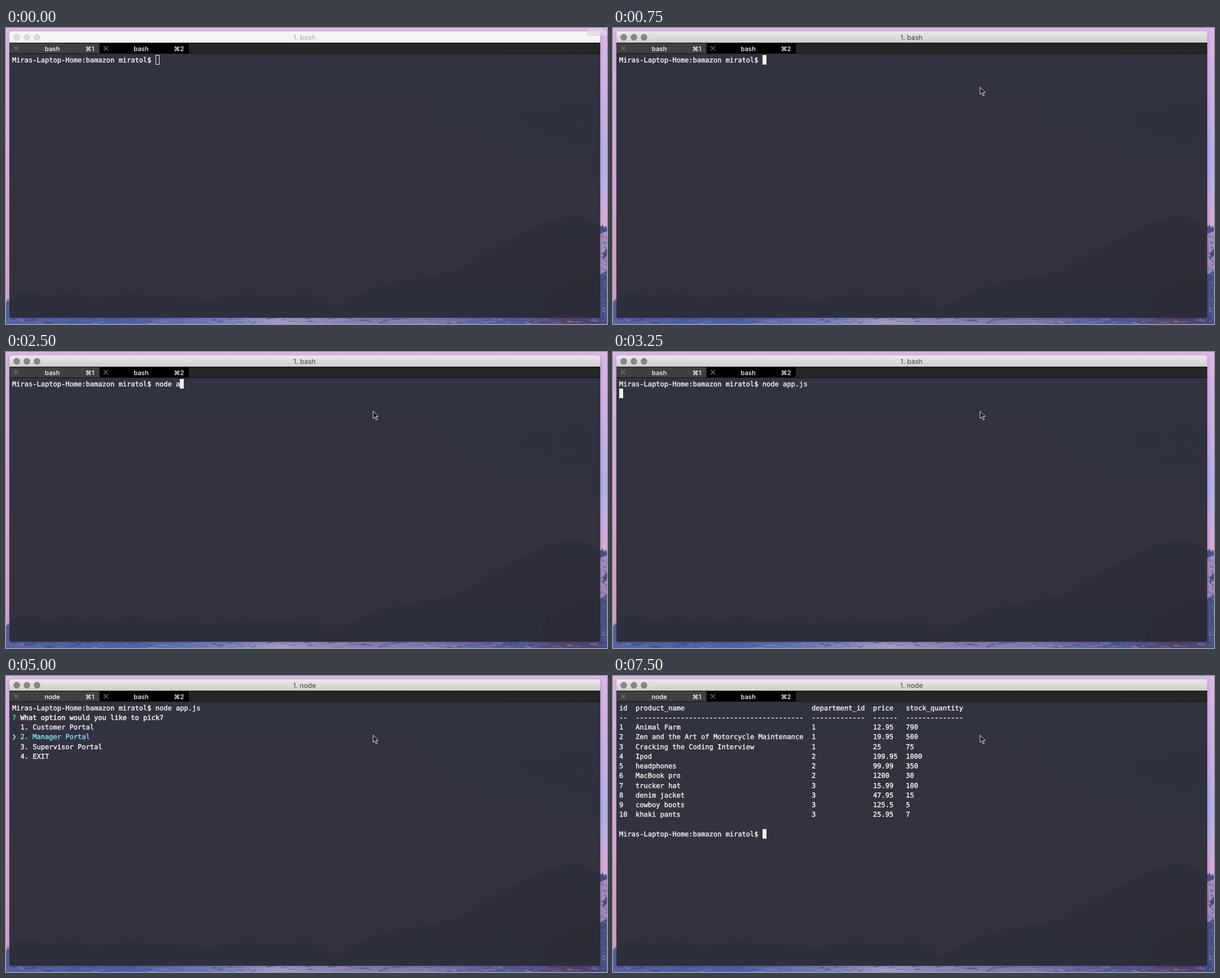
An HTML page that plays this animation: 1065 by 526 pixels, repeating every 8000 ms.

```html
<!DOCTYPE html>
<html lang="en">
<head>
<meta charset="utf-8">
<title>Terminal session</title>
<style>
  html, body { margin: 0; width: 100%; height: 100%; overflow: hidden; background: #d9aede; }
  svg { display: block; width: 1065px; height: 526px; }
  text { white-space: pre; text-rendering: geometricPrecision; }
  .ui { font: 12px Inter, "DejaVu Sans", sans-serif; text-anchor: middle; }
  .tab { font-size: 11.3px; font-weight: 500; fill: #fff; }
  #lines { font: 12.052px "DejaVu Sans Mono", monospace; }
  #lines text { fill: #f3f3f3; stroke: #f3f3f3; stroke-width: .4px; }
  #lines .bold { stroke-width: .55px; }
  #lines .green { fill: #2ce89c; stroke: #2ce89c; }
  #lines .cyan { fill: #83e3ef; stroke: #83e3ef; }
  #lines .dim { fill: #8b8a92; stroke: #8b8a92; }
  .cross { stroke: #777; stroke-width: 1.1; }
</style>
</head>
<body>
<svg viewBox="0 0 1065 526" xmlns="http://www.w3.org/2000/svg">
  <defs>
    <linearGradient id="sky" x2="0" y2="1">
      <stop offset="0" stop-color="#dfb8ea"/><stop offset=".35" stop-color="#dfb2e4"/>
      <stop offset=".75" stop-color="#e2a8d6"/><stop offset="1" stop-color="#d0a2d0"/>
    </linearGradient>
    <linearGradient id="rightSky" x2="0" y2="1">
      <stop offset="0" stop-color="#dcb6e8"/><stop offset=".28" stop-color="#cbaee8"/>
      <stop offset=".45" stop-color="#b0aeec"/><stop offset=".55" stop-color="#c2aee6"/>
      <stop offset=".66" stop-color="#dbaad8"/><stop offset="1" stop-color="#c692c4"/>
    </linearGradient>
    <linearGradient id="valley">
      <stop offset="0" stop-color="#5563a2"/><stop offset=".2" stop-color="#4c62a8"/>
      <stop offset=".36" stop-color="#7a82ba"/><stop offset=".45" stop-color="#a09cc8"/>
      <stop offset=".57" stop-color="#8883b6"/><stop offset=".7" stop-color="#7f7cb0"/>
      <stop offset=".85" stop-color="#535a96"/><stop offset=".94" stop-color="#574468"/>
      <stop offset="1" stop-color="#434b80"/>
    </linearGradient>
    <linearGradient id="bar" x2="0" y2="1">
      <stop offset="0" stop-color="#ebe9eb"/><stop offset="1" stop-color="#cfcdcf"/>
    </linearGradient>
    <linearGradient id="pane" x2="0" y2="1">
      <stop offset="0" stop-color="#323340"/><stop offset=".5" stop-color="#33323f"/>
      <stop offset=".85" stop-color="#34313e"/><stop offset="1" stop-color="#32313e"/>
    </linearGradient>
    <radialGradient id="cool" cx=".5" cy=".5" r=".5">
      <stop offset="0" stop-color="#2c303f" stop-opacity=".55"/><stop offset="1" stop-color="#2c303f" stop-opacity="0"/>
    </radialGradient>
    <filter id="soft" x="-5%" y="-5%" width="110%" height="110%"><feGaussianBlur stdDeviation="3"/></filter>
    <clipPath id="paneClip"><path d="M6 46H1053V511Q1053 515 1049 515H10Q6 515 6 511Z"/></clipPath>
  </defs>

  <rect width="1065" height="526" fill="url(#sky)"/>
  <rect x="1050" width="15" height="526" fill="url(#rightSky)"/>
  <path fill="#4a5288" d="M1050 350L1055 353 1057 349 1060 355 1063 351 1065 357V526H1050Z"/>
  <path fill="#a98dbe" d="M1053 366L1065 361V392L1059 398 1057 412 1065 404V431L1053 438Z"/>
  <path fill="url(#valley)" d="M0 488L4 481 7 490V514H1065V526H0Z"/>
  <g id="rocks"></g>
  <rect x="5" y="7" width="1049" height="510" rx="6" fill="#34204a" id="shadow" filter="url(#soft)"/>

  <path d="M6 46H1053V511Q1053 515 1049 515H10Q6 515 6 511Z" fill="url(#pane)"/>
  <g clip-path="url(#paneClip)">
    <ellipse cx="1010" cy="150" rx="300" ry="150" fill="url(#cool)"/>
    <path fill="#2c2e3b" d="M560 515L610 482 650 461 720 446 790 433 850 400 910 368 965 341 1010 332 1053 352V515Z" opacity=".6"/>
    <path fill="#2b2d38" d="M780 515L850 440 930 390 1000 350 1053 362V515Z" opacity=".3"/>
    <path fill="#2b2e3c" d="M6 480L30 465 70 476 110 470 160 481 220 471 290 478 360 482 420 473 500 477 530 470 570 490 610 515H6Z" opacity=".6"/>
    <path fill="#2b2b34" d="M940 515L960 470 1008 444 1053 436V515Z" opacity=".5"/>
  </g>

  <path d="M6 26V11Q6 6 11 6H1048Q1053 6 1053 11V26Z" id="title"/>
  <g id="lights"></g>
  <text class="ui" x="529" y="21" id="name"></text>

  <rect x="6" y="26" width="1047" height="20" fill="#262626"/>
  <rect x="6" y="27" width="159" height="18" fill="#404040"/>
  <rect x="166" y="27" width="158" height="19" fill="#000"/>
  <path d="M6 26.5H1053" stroke="#1a1a1a"/>
  <path d="M6 45.5H1053" stroke="#121216"/>
  <path class="cross" d="M14 32L22 40M22 32L14 40M173 32L181 40M181 32L173 40"/>
  <text class="ui tab" x="82" y="41" id="job"></text>
  <text class="ui tab" x="148.5" y="41">⌘1</text>
  <text class="ui tab" x="239.5" y="41">bash</text>
  <text class="ui tab" x="306.5" y="41">⌘2</text>

  <g id="lines"></g>
  <rect id="caret" stroke="#f0f0f0"/>
  <g id="notice">
    <path d="M1030 0H1065V13.500H1035Q1030 13.500 1030 8.500Z" fill="#e6d6ea" opacity=".72" stroke="#c9bfcc" stroke-width=".7"/>
    <text class="ui" x="1061" y="4" fill="#aaa0ad">10</text>
  </g>
  <path id="mouse" d="M0 0V13L3 10.300 5.200 15.800 7.300 14.900 5.100 9.500H9Z" fill="#14141a" stroke="#e8e8e8" stroke-linejoin="round"/>
</svg>
<script>
const LOOP = 8000, COL = 7.256, ROW = 17.23, LEFT = 11, TOP = 48;
const $ = id => document.getElementById(id);

function add(parent, tag, attrs, text = '') {
  const el = document.createElementNS('http://www.w3.org/2000/svg', tag);
  for (const k in attrs) el.setAttribute(k, attrs[k]);
  el.textContent = text;
  parent.append(el);
  return el;
}

// Each text piece is [row, column, text, class].
const PROMPT = 'Miras-Laptop-Home:bamazon miratol$ ';
const prompt = (typed, row = 0) => [[row, 0, PROMPT + typed]];
const command = prompt('node app.js');
const ask = (row, text) => [[row, 0, '?', 'green bold'], [row, 2, text, 'bold']];
const question = ask(1, 'What option would you like to pick?');
const hint = (row, col) => [[row, col, '(Use arrow keys)', 'dim']];

const menu = (row, items, picked) => items.flatMap((item, i) => i === picked
  ? [[row + i, 0, '❯', 'cyan'], [row + i, 2, item, 'cyan']]
  : [[row + i, 2, item]]);

const portals = ['1. Customer Portal', '2. Manager Portal', '3. Supervisor Portal', '4. EXIT'];
const tasks = ['1) List all products', '2) View low stock items', '3) Restock a product', '4) Add a new product'];

const columns = [0, 4, 47, 62, 70];
const dashes = [2, 41, 13, 6, 14].map(n => '-'.repeat(n)).join('|');
const table = `id|product_name|department_id|price|stock_quantity
${dashes}
1|Animal Farm|1|12.95|790
2|Zen and the Art of Motorcycle Maintenance|1|19.95|500
3|Cracking the Coding Interview|1|25|75
4|Ipod|2|199.95|1000
5|headphones|2|99.99|350
6|MacBook pro|2|1200|30
7|trucker hat|3|15.99|100
8|denim jacket|3|47.95|15
9|cowboy boots|3|125.5|5
10|khaki pants|3|25.95|7`.split('\n')
  .flatMap((line, row) => line.split('|').map((cell, i) => [row, columns[i], cell]));

const typing = typed => ({ lines: prompt(typed), caret: [0, PROMPT.length + typed.length] });

// Every step changes only the listed parts of the state.
const steps = [
  [0, { ...typing(''), active: false, notice: true, mouse: null, job: 'bash' }],
  [250, { notice: false, mouse: [738, 73] }],
  [500, { mouse: [650.6, 105] }],
  [750, { active: true }],
  [1750, typing('nod')],
  [2000, typing('node')],
  [2500, typing('node a')],
  [2750, typing('node app')],
  [3000, typing('node app.js ')],
  [3250, { lines: command, caret: [1, 0] }],
  [4000, { lines: [...command, ...question, ...hint(1, 38), ...menu(2, portals, 0)], caret: null }],
  [5000, { lines: [...command, ...question, ...menu(2, portals, 1)], job: 'node' }],
  [5250, { lines: command }],
  [5500, { lines: [...command, ...question, [1, 38, portals[1], 'cyan'],
    ...ask(2, 'Choice an option:'), ...hint(2, 21), ...menu(3, tasks, 0)] }],
  [7500, { lines: [...table, ...prompt('', 13)], caret: [13, PROMPT.length] }]
];
let last = {};
const states = steps.map(([at, change]) => [at, last = { ...last, ...change }]);

const lights = [19, 37, 55].map(cx => add($('lights'), 'circle', { cx, cy: 16.5, r: 5.2 }));

function show(s) {
  $('title').setAttribute('fill', s.active ? 'url(#bar)' : '#f6f5f6');
  $('shadow').setAttribute('opacity', s.active ? .26 : .18);
  $('name').setAttribute('fill', s.active ? '#434143' : '#aaa8aa');
  $('name').textContent = '1. ' + s.job;
  $('job').textContent = s.job;
  for (const l of lights) {
    l.setAttribute('fill', s.active ? '#898789' : '#dddcdd');
    l.setAttribute('stroke', s.active ? '#6d6b6d' : '#c8c7c8');
  }
  $('notice').style.display = s.notice ? '' : 'none';
  $('mouse').style.display = s.mouse ? '' : 'none';
  if (s.mouse) $('mouse').setAttribute('transform', `translate(${s.mouse})`);

  $('lines').replaceChildren();
  for (const [row, col, text, cls = ''] of s.lines)
    add($('lines'), 'text', { x: LEFT + col * COL, y: Math.round(TOP + 12.8 + row * ROW), class: cls }, text);

  const caret = $('caret');
  caret.style.display = s.caret ? '' : 'none';
  if (s.caret) {
    caret.setAttribute('x', Math.round(LEFT + s.caret[1] * COL) + .5);
    caret.setAttribute('y', Math.round(TOP + s.caret[0] * ROW) + .5);
    caret.setAttribute('width', 6);
    caret.setAttribute('height', 16);
    caret.setAttribute('fill', s.active ? '#f0f0f0' : 'none');
  }
}

// Loose streaks of light and shade on the visible mountain edges.
let seed = 7;
const rnd = () => (seed = seed * 16807 % 2147483647) / 2147483647;
const tones = ['#7d78b0', '#3a4580', '#ab96c4', '#5d68a6', '#38427c'];
for (let i = 0; i < 240; i++) {
  const side = i < 80;
  const x = side ? 1053 + rnd() * 11 : rnd() * 1060;
  const y = side ? 365 + rnd() * 155 : 516 + rnd() * 9;
  const dx = side ? 2 + rnd() * 5 : 4 + rnd() * 14;
  add($('rocks'), 'path', {
    d: `M${x} ${y}l${dx} ${side ? -4 + rnd() * 10 : -3 + rnd() * 6}`,
    stroke: tones[Math.floor(rnd() * tones.length)], 'stroke-width': 1 + rnd() * 1.5, opacity: .5
  });
}

const start = performance.now();
let shown;
function tick(now) {
  const t = Math.max(0, now - start) % LOOP;
  const [, state] = states.findLast(([at]) => at <= t);
  if (state !== shown) show(shown = state);
  requestAnimationFrame(tick);
}
tick(start);
</script>
</body>
</html>
```
